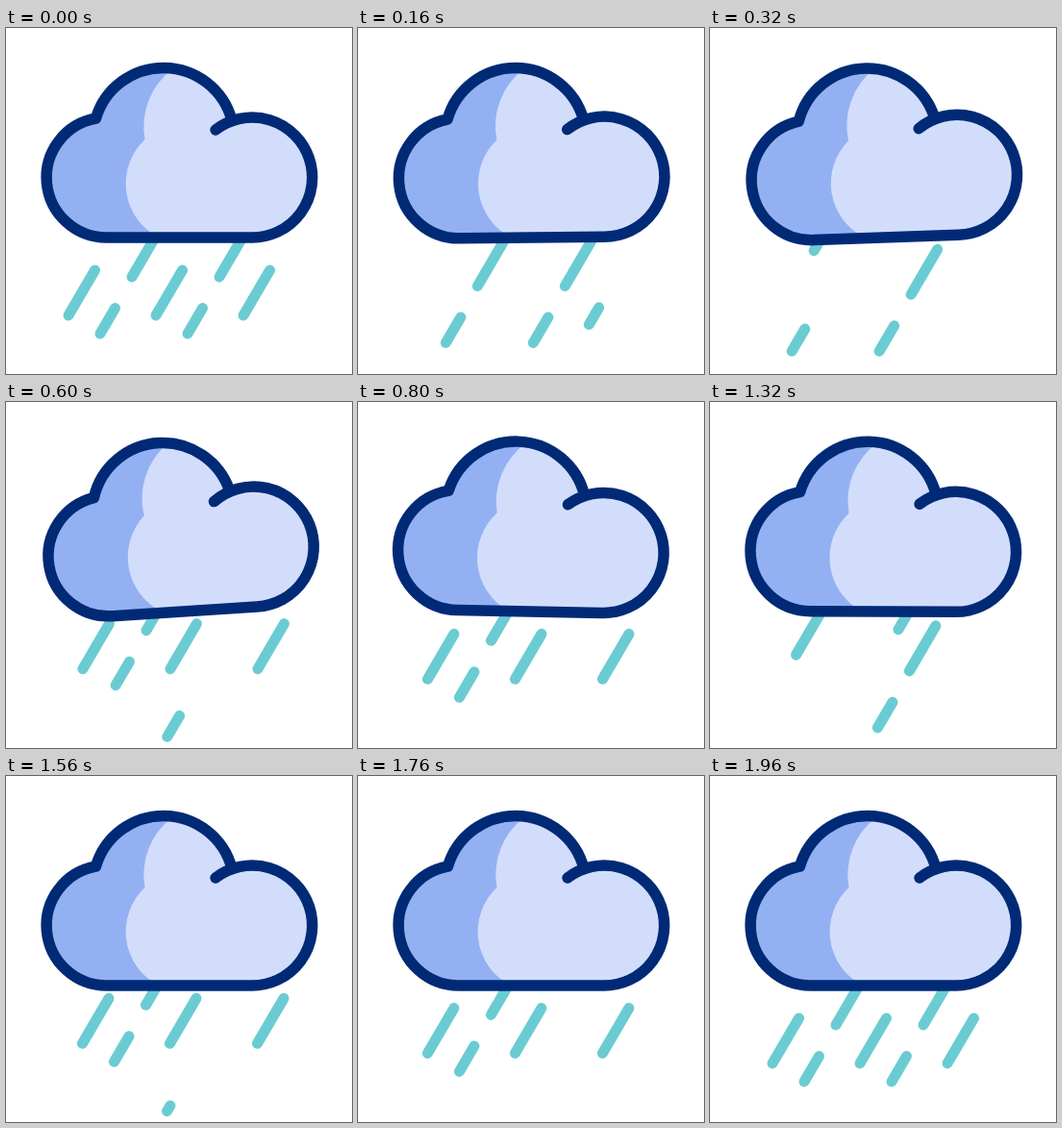
These frames come from a looping animation (360 px wide and 360 px high, 2 s). An HTML page:

```html
<!DOCTYPE html>
<html lang="en">
<head>
<meta charset="utf-8">
<title>Rain cloud</title>
<style>
  html, body { margin: 0; width: 100%; height: 100%; overflow: hidden; background: #fff; }
  svg { display: block; width: 100vw; height: 100vh; }
</style>
</head>
<body>
<svg viewBox="0 0 360 360">
  <defs>
    <path id="outline" d="M218 106A62.5 62.5 0 1 1 255.5 218H105A62.5 62.5 0 0 1 93.5 94A73.5 73.5 0 0 1 235 96"/>
  </defs>
  <g id="rain" fill="none" stroke="#6accd2" stroke-width="11" stroke-linecap="round"></g>
  <g id="cloud">
    <use href="#outline" fill="#d2ddfc"/>
    <path fill="#93b1f2" d="M173 43A75 75 0 0 0 144.5 116A63 63 0 0 0 157 217H105A62.5 62.5 0 0 1 93.5 94A73.5 73.5 0 0 1 173 43"/>
    <use href="#outline" fill="none" stroke="#012a76" stroke-width="11.5" stroke-linecap="round" stroke-linejoin="round"/>
  </g>
</svg>
<script>
const LOOP = 2000, STEP = 40, CYCLE = 980, TRIM = 80, COLUMN = 91;

// Each row repeats one drop sideways, every copy later by lag.
// x, y: lower end at rest; fade, birth: start of shrinking and regrowth
const rows = [
  { x: 65, y: 299, len: 47, count: 3, fade: 20, birth: 300, lag: 45 },
  { x: 131, y: 259, len: 47, count: 2, fade: 220, birth: 520, lag: 276 },
  { x: 98, y: 318, len: 26.5, count: 2, fade: 310, birth: 526, lag: 276 },
];
const drops = rows.flatMap(row => Array.from({ length: row.count }, (_, i) => ({
  x: row.x + i * COLUMN,
  y: row.y,
  len: row.len,
  fade: row.fade + i * row.lag,
  birth: row.birth + i * row.lag,
})));

const rain = document.getElementById("rain");
const cloud = document.getElementById("cloud");
const lines = drops.map(() =>
  rain.appendChild(document.createElementNS("http://www.w3.org/2000/svg", "path")));

const clamp = x => Math.max(0, Math.min(1, x));
const ease = (t, from, to) => {
  const x = clamp((t - from) / (to - from));
  return x * x * (3 - 2 * x);
};

// Lean slowly to the left, snap back past level, then settle
const tilt = t => -3.7 * ease(t, 0, 600) + 5.2 * ease(t, 600, 840) - 1.5 * ease(t, 840, 1500);

function dropPath({ x, y, len, fade, birth }, phase, early) {
  const shrink = clamp((phase - fade + early) / TRIM);
  const fresh = shrink === 1;
  const grow = fresh ? clamp((phase - birth) / TRIM) : 1;
  if (grow === 0) return "";
  const fall = 36 * Math.sin((fresh ? phase - CYCLE : phase) / 600);
  // k runs from 0 at the lower end to 1 at the upper end
  const point = k => `${x - 0.7 * fall + 0.585 * len * k} ${y + fall - len * k}`;
  return `M${point(fresh ? 1 : 1 - shrink)}L${point(1 - grow)}`;
}

function draw(now) {
  const t = Math.floor(now % LOOP / STEP) * STEP;
  const second = t >= CYCLE && t < 2 * CYCLE;
  let phase = t % CYCLE;
  // The second burst runs slightly ahead
  if (second) phase += 35 * Math.sin(Math.PI * phase / CYCLE);
  drops.forEach((drop, i) =>
    lines[i].setAttribute("d", dropPath(drop, phase, second ? 35 : 0)));
  cloud.setAttribute("transform", `rotate(${tilt(t)} 180 129)`);
}

const start = performance.now();
function frame() {
  draw(performance.now() - start);
  requestAnimationFrame(frame);
}
frame();
</script>
</body>
</html>
```
